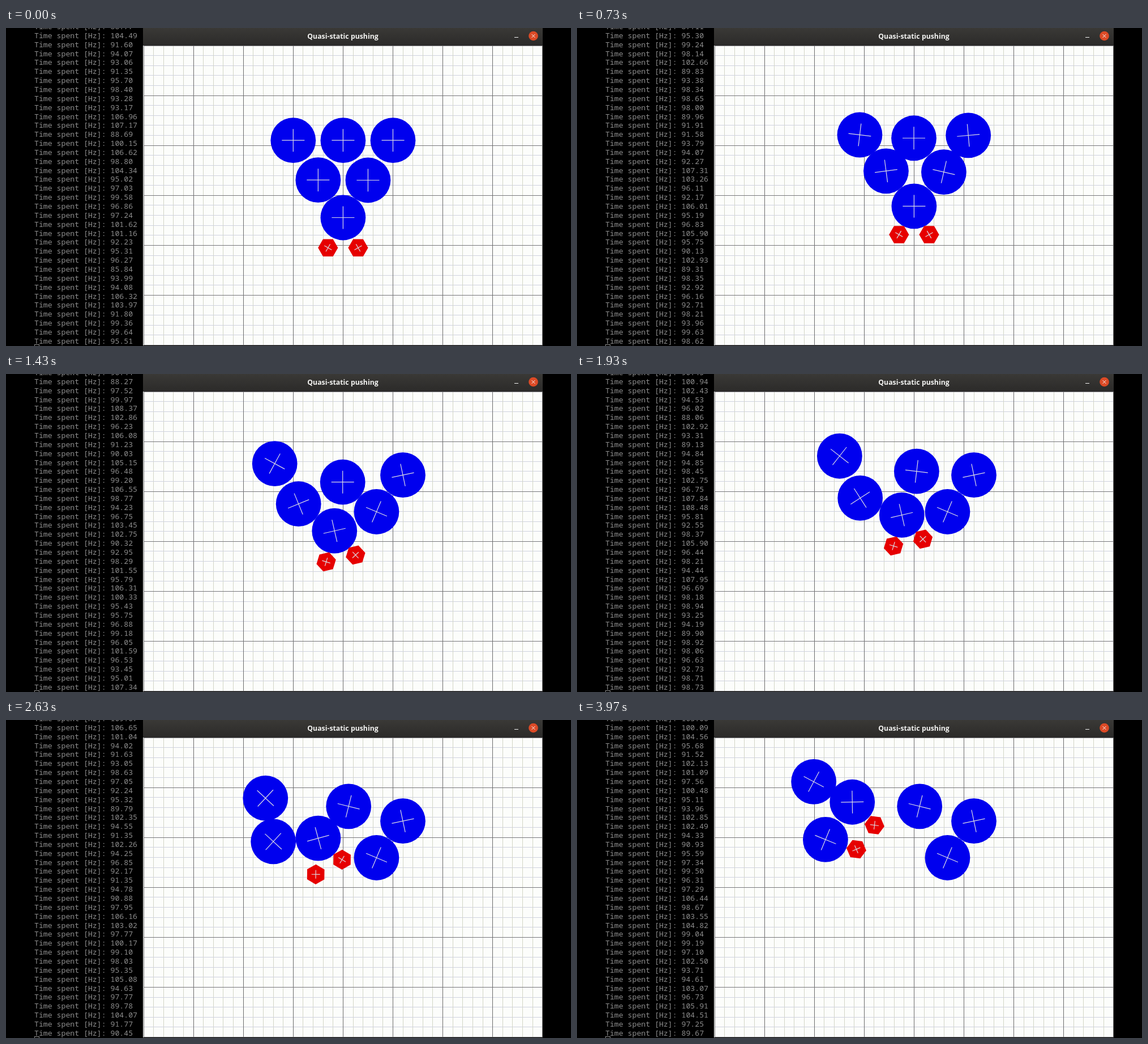
Write an HTML page with a canvas that moves like this. It is 998 by 561 pixels and loops after 4010 ms.

```html
<!DOCTYPE html>
<html lang="en">
<head>
<meta charset="utf-8">
<title>Quasi-static pushing</title>
<style>
html, body { margin: 0; width: 100%; height: 100%; overflow: hidden; background: #000; }
canvas { display: block; }
</style>
</head>
<body>
<canvas id="stage" width="998" height="561"></canvas>
<script>
const g = document.getElementById('stage').getContext('2d');
const LOOP = 4010, STEP = 100 / 3, LAST = 119;
const LEFT = 243, TOP = 31, CELL = 17.62, MID = 595.4;
const RADIUS = 39.9, ARM = 26.6, REACH = 56.6;
const FIRST_TOUCH = 375, ROLL_END = 3270;
const rad = degrees => degrees * Math.PI / 180;
const clamp = (v, low, high) => Math.min(high, Math.max(low, v));

// Gripper heading: [time, degrees]
const turns = [[850, 0], [1400, -13], [1930, -13], [2630, -29], [2890, -50], [3970, -53]];

function heading(t) {
  const i = turns.findIndex(k => k[0] > t);
  if (i === 0) return 0;
  if (i < 0) return turns[turns.length - 1][1];
  const [t0, a] = turns[i - 1], [t1, b] = turns[i];
  return a + (b - a) * (t - t0) / (t1 - t0);
}

// The gripper drives along its heading, slowly speeding up.
function gripper(t) {
  let x = MID, y = 387.7;
  const dt = 5;
  for (let s = 310; s < t; s += dt) {
    const way = Math.min(dt, t - s) * (0.054 + 0.000002 * s), a = rad(heading(s));
    x += way * Math.sin(a);
    y -= way * Math.cos(a);
  }
  return [x, y, heading(t)];
}

// The front disc rests on both fingers, then rolls around the right one.
function frontDisc(t) {
  const [x, y, angle] = gripper(t);
  const bearing = Math.max(angle, -20.5), roll = bearing - angle, a = rad(roll);
  const d = ARM * Math.sin(a) + Math.sqrt(REACH ** 2 - (ARM * Math.cos(a)) ** 2);
  return [
    x + d * Math.sin(rad(bearing)),
    Math.min(334.5, y - d * Math.cos(rad(bearing))),
    bearing + 0.6 * roll
  ];
}

// The left neighbour rolls around the front disc until they part.
function leftDisc(t) {
  const s = clamp(t, FIRST_TOUCH, ROLL_END), tau = (s - FIRST_TOUCH) / 1000;
  const [x, y] = frontDisc(s), a = rad(33.7 + 11 * tau + 7 * tau * tau);
  const start = [x - 79.4 * Math.sin(a), y - 79.4 * Math.cos(a), -21 * tau];
  return pushed(t, start, [3640, 3970, -15.8, -5.7, -7, 1]);
}

// Each push: start, end, dx, dy, turn, ease-out power
function pushed(t, pose, ...pushes) {
  for (const [t0, t1, dx, dy, turn, power] of pushes) {
    const u = 1 - (1 - clamp((t - t0) / (t1 - t0), 0, 1)) ** power;
    pose = [pose[0] + dx * u, pose[1] + dy * u, pose[2] + turn * u];
  }
  return pose;
}

function discs(t) {
  const gap = 5 * CELL, back = 198.2;
  return [
    frontDisc(t),
    leftDisc(t),
    pushed(t, [MID + gap / 2, 268.5, 0], [FIRST_TOUCH, 1430, 15, -25.5, 23, 2]),
    pushed(t, [MID - gap, back, 0], [560, 2630, -49, -60.3, 43, 2], [3150, 3970, -40.3, -29.2, -15, 1]),
    pushed(t, [MID, back, 0], [420, 1430, -0.7, -7.5, 0, 2], [1650, 2630, 10.5, -38.4, 14, 2]),
    pushed(t, [MID + gap, back, 0], [500, 1430, 17.5, -20, -12, 2])
  ];
}

const random = n => {
  const v = Math.sin(n * 12.9898) * 43758.5453;
  return v - Math.floor(v);
};
const rate = n => 97.5 + 12 * (random(n) + random(n + 0.5) - 1);

function line(x1, y1, x2, y2) {
  g.beginPath();
  g.moveTo(x1, y1);
  g.lineTo(x2, y2);
  g.stroke();
}

function cross(size, degrees) {
  g.rotate(rad(degrees));
  line(-size, 0, size, 0);
  line(0, -size, 0, size);
}

function drawLog(first) {
  g.font = '13.2px "Noto Sans Mono", monospace';
  g.textAlign = 'left';
  g.fillStyle = g.strokeStyle = '#8c8c8c';
  for (let r = 0; r < 36; r++) {
    g.fillText('Time spent [Hz]: ' + rate(first + r).toFixed(2), 50, 2 + r * 15.85);
  }
  g.strokeRect(50.5, 558.5, 8, 14);
}

function drawGrid(major) {
  for (let i = 0; i <= 40; i++) {
    if ((i % 5 === 0) !== major) continue;
    const x = Math.floor(LEFT + i * CELL) + 0.5, y = Math.floor(TOP + i * CELL) + 0.5;
    g.strokeStyle = major ? '#6c6c6c' : '#d2d5c6';
    line(x, TOP, x, 560);
    g.strokeStyle = major ? '#77777c' : '#cfd2df';
    if (i <= 30) line(LEFT, y, 948, y);
  }
}

function drawWindow() {
  const bar = g.createLinearGradient(0, 0, 0, TOP);
  bar.addColorStop(0, '#3a3936');
  bar.addColorStop(1, '#2b2a29');
  g.fillStyle = bar;
  g.fillRect(LEFT - 1, 0, 706, TOP);
  g.fillStyle = '#fcfdfb';
  g.fillRect(LEFT - 1, TOP, 706, 529);
  drawGrid(false);
  drawGrid(true);

  g.font = 'bold 12.3px "Open Sans", sans-serif';
  g.textAlign = 'center';
  g.fillStyle = g.strokeStyle = '#f4f4f2';
  g.fillText('Quasi-static pushing', 595, 19);
  line(898, 16.5, 905, 16.5);
  g.fillStyle = '#dc4a26';
  g.beginPath();
  g.arc(931.5, 14, 8.3, 0, 7);
  g.fill();
  line(928.5, 11, 934.5, 17);
  line(928.5, 17, 934.5, 11);
}

function drawDisc([x, y, angle]) {
  g.save();
  g.translate(x, y);
  g.fillStyle = '#0000ee';
  g.beginPath();
  g.arc(0, 0, RADIUS, 0, 7);
  g.fill();
  cross(20, angle);
  g.restore();
}

function drawGripper([x, y, angle]) {
  g.save();
  g.translate(x, y);
  g.rotate(rad(angle));
  for (const side of [-1, 1]) {
    g.save();
    g.translate(side * ARM, 0);
    g.fillStyle = '#e60000';
    g.beginPath();
    for (let i = 0; i < 6; i++) {
      g.lineTo(17.6 * Math.cos(i * Math.PI / 3), 17.6 * Math.sin(i * Math.PI / 3));
    }
    g.fill();
    cross(7.5, -30 * side);
    g.restore();
  }
  g.restore();
}

function draw(now) {
  const step = Math.min(LAST, Math.floor((now % LOOP + 3.4) / STEP));
  const t = step * STEP;
  g.fillStyle = '#000';
  g.fillRect(0, 0, 998, 561);
  g.lineWidth = 1;
  drawLog(Math.floor(t / 10));
  drawWindow();
  g.strokeStyle = '#dcdce4';
  g.lineWidth = 1.2;
  discs(t).forEach(drawDisc);
  drawGripper(gripper(t));
}

const start = performance.now();
function tick() {
  draw(performance.now() - start);
  requestAnimationFrame(tick);
}
tick();
</script>
</body>
</html>
```
